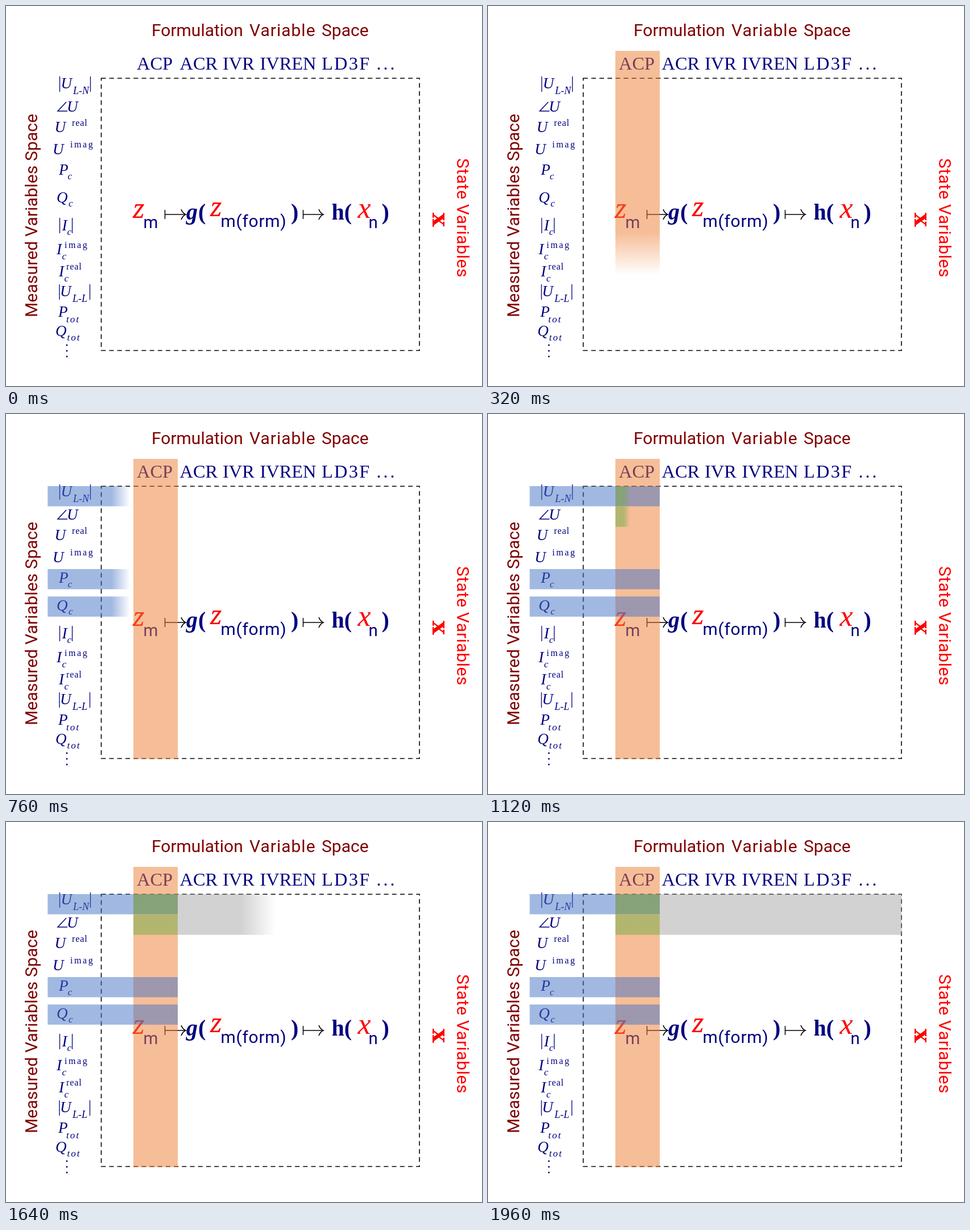
An HTML page with a canvas that plays this animation: 837x669 px, repeating every 2000 ms.

```html
<!DOCTYPE html>
<html lang="en">
<head>
<meta charset="utf-8">
<title>Variable spaces</title>
<style>
html, body { margin: 0; width: 100%; height: 100%; overflow: hidden; background: #fff; }
canvas { display: block; }
</style>
</head>
<body>
<canvas id="stage" width="837" height="669"></canvas>
<script>
const ctx = document.getElementById('stage').getContext('2d');
const LOOP = 2000, STEP = 40, WIPE = 489, SOFT = 1 / 7;
const NAVY = '#000080', MAROON = '#800000', RED = '#ff0000', BLACK = '#000';
const SERIF = '"Liberation Serif", "Times New Roman", serif';
const SANS = 'Roboto, "Liberation Sans", sans-serif';

const roman = s => `${s}px ${SERIF}`;
const italic = s => `italic ${s}px ${SERIF}`;
const bold = s => `bold ${s}px ${SERIF}`;
const sans = s => `${s}px ${SANS}`;
const thin = s => `italic 300 ${s}px "Noto Serif", ${SERIF}`;

function text(str, x, y, font, color = NAVY, gap = 0) {
  ctx.font = font;
  ctx.fillStyle = color;
  ctx.letterSpacing = gap + 'px';
  ctx.fillText(str, x, y);
}

function turned(str, x, y, angle, font, color, gap) {
  ctx.save();
  ctx.translate(x, y);
  ctx.rotate(angle);
  text(str, 0, 0, font, color, gap);
  ctx.restore();
}

function line(points, color, width) {
  ctx.beginPath();
  points.forEach(([x, y]) => ctx.lineTo(x, y));
  ctx.strokeStyle = color;
  ctx.lineWidth = width;
  ctx.stroke();
}

function dot(x, y) {
  ctx.beginPath();
  ctx.arc(x, y, 1.5, 0, Math.PI * 2);
  ctx.fillStyle = NAVY;
  ctx.fill();
}

const bar = (x, top) => line([[x, top], [x, top + 27]], NAVY, 1.3);
const big = (s, x, y) => text(s, x, y, italic(27));
const sub = (s, x, y, size = 17, gap = 0) => text(s, x, y, italic(size), NAVY, gap);
const sup = (s, x, y, gap) => text(s, x, y, roman(16), NAVY, gap);

function mapsTo(x1, x2, y) {
  line([[x1, y - 8], [x1, y + 8]], BLACK, 1.5);
  line([[x1, y], [x2, y]], BLACK, 1.7);
  ctx.beginPath();
  ctx.moveTo(x2 - 8, y - 9);
  ctx.quadraticCurveTo(x2 - 5, y - 2, x2, y);
  ctx.quadraticCurveTo(x2 - 5, y + 2, x2 - 8, y + 9);
  ctx.stroke();
}

function titles() {
  text('Formulation', 256, 53, sans(30), MAROON);
  text('Variable', 428, 53, sans(30), MAROON, 1);
  text('Space', 555, 53, sans(30), MAROON);
  turned('Measured Variables Space', 55, 548, -Math.PI / 2, sans(30), MAROON, 0.15);
  turned('State Variables', 793, 268, Math.PI / 2, sans(30), RED, 0.6);
  turned('x', 750, 364, Math.PI / 2, 'bold 41px "DejaVu Serif", serif', RED);

  [['ACP', 230], ['ACR', 305.5], ['IVR', 381], ['IVREN', 446.5]]
    .forEach(([s, x]) => text(s, x, 112, roman(32.4), NAVY));
  text('LD3F', 555, 112, roman(32.4), NAVY, 2.3);
  text('...', 651.5, 112, roman(32), NAVY, 4);
}

function labels() {
  bar(94.5, 124); big('U', 96.5, 145); sub('L-N', 118, 155, 18); bar(148.5, 124);

  line([[106, 169], [91, 185], [108, 185]], NAVY, 1.5);
  big('U', 107, 186);

  big('U', 85.5, 222); sup('real', 116, 211, 0.9);
  big('U', 82, 261); sup('imag', 113, 249, 2.6);
  big('P', 93, 297); sub('c', 108.5, 305);
  big('Q', 89, 346); sub('c', 110, 353);

  bar(94.5, 373); big('I', 98.5, 395); sub('c', 107.5, 403); bar(116.5, 373);

  big('I', 89, 437); sup('imag', 103, 426, 2.6); sub('c', 98.5, 446);
  big('I', 93, 476); sup('real', 106, 464, 0.9); sub('c', 102.5, 485);

  bar(94, 490); big('U', 95, 511); sub('L-L', 117, 521, 18); bar(147.5, 490);

  big('P', 92, 547); sub('tot', 106, 557, 17, 2);
  big('Q', 87, 581); sub('tot', 107.5, 589, 17, 2);
  [597, 607, 617].forEach(y => dot(107, y));
}

function formula() {
  text('z', 222.5, 373, thin(43), RED);
  text('m', 241.5, 391, sans(29.5));
  mapsTo(279.5, 316, 367);
  text('g', 317, 376, `italic ${bold(40)}`);
  text('(', 338, 376, bold(40));
  text('z', 358.5, 369.5, thin(43), RED);
  text('m(form)', 377.5, 389, sans(30), NAVY, 0.7);
  text(')', 501, 376, bold(40));
  mapsTo(522.5, 558, 367);
  text('h(', 572.5, 376, bold(40));
  text('x', 618.5, 373, italic(52), RED);
  text('n', 637.5, 391, sans(29.5));
  text(')', 660.5, 376, bold(40));
}

function frame() {
  ctx.setLineDash([8.1, 6.1]);
  ctx.strokeStyle = BLACK;
  ctx.lineWidth = 1.6;
  ctx.strokeRect(167.5, 127.2, 559.5, 479.3);
  ctx.setLineDash([]);
}

// Half-transparent box revealed from its left or top edge with a soft front.
function wipe(t, rgb, x, y, w, h, down) {
  const u = Math.min(1, t / WIPE);
  if (u <= 0) return;
  const size = down ? h : w, start = down ? y : x;
  const head = start + size * u * (1 + SOFT), tail = head - size * SOFT;
  const g = down ? ctx.createLinearGradient(0, tail, 0, head)
                 : ctx.createLinearGradient(tail, 0, head, 0);
  g.addColorStop(0, `rgba(${rgb},0.5)`);
  g.addColorStop(1, `rgba(${rgb},0)`);
  ctx.fillStyle = g;
  ctx.fillRect(x, y, w, h);
}

function draw(t) {
  ctx.fillStyle = '#fff';
  ctx.fillRect(0, 0, 837, 669);
  frame();
  titles();
  labels();
  formula();
  wipe(t, '237,125,49', 224, 79, 78, 528.5, true);
  [127, 273, 321.3].forEach(y => wipe(t - WIPE, '68,114,196', 73.3, y, 228.7, 35.5));
  wipe(t - 2 * WIPE, '112,173,71', 224, 127, 78, 35.5);
  wipe(t - 2 * WIPE, '112,173,71', 224, 163.2, 78, 35.5);
  wipe(t - 3 * WIPE, '165,165,165', 302, 127, 425.5, 71.7);
}

const began = performance.now();
function tick() {
  const t = (performance.now() - began) % LOOP;
  draw(Math.floor(t / STEP) * STEP);
  requestAnimationFrame(tick);
}
tick();
</script>
</body>
</html>
```
